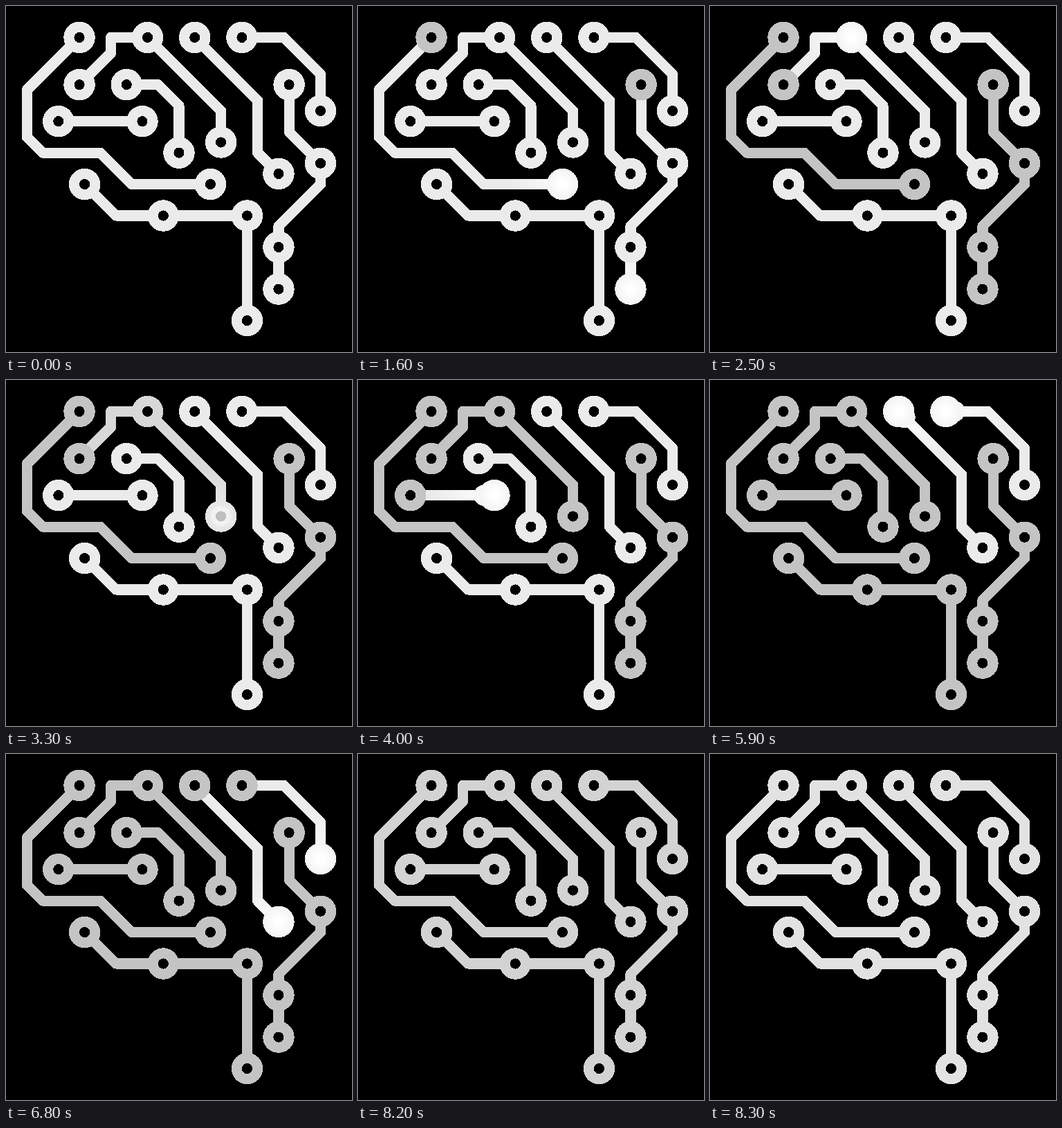
Recreate the animation shown at these times as an HTML page. Size 500 px wide and 500 px high, loop 8400 ms.

```html
<!DOCTYPE html>
<html lang="en">
<head>
<meta charset="utf-8">
<title>Circuit brain</title>
<style>
  html, body { margin: 0; width: 100%; height: 100%; overflow: hidden; background: #000; }
  svg { display: block; width: 500px; height: 500px; }
  path, circle { fill: none; stroke-width: 2; stroke-linejoin: round; shape-rendering: crispEdges; }
  .ring { fill: #000; }
  .glow { fill: url(#glow); }
</style>
</head>
<body>
<svg id="stage" viewBox="0 0 66 66">
  <radialGradient id="glow">
    <stop offset=".2" stop-color="#fff"/>
    <stop offset="1" stop-color="#f3f3f3"/>
  </radialGradient>
</svg>
<script>
const stage = document.getElementById('stage');
const LOOP = 8400, PAUSE = 500, STEP = 200;
const LIGHT = 235, DIM = 196;

// A track is a line with a ring at its start and at each "|" and at its end.
// A group holds its first step for PAUSE; "lead" is the pulse's progress right after it.
const groups = [
  { steps: 6, lead: 0.4, tracks: ['M14 6l-10 10v9l3 3h11l6 6h15', 'M54 15v9l6 6|v4l-8 8v4|v8'] },
  { steps: 6, lead: 0.41, tracks: ['M14 15l6-6v-3h7|l14 14v6'] },
  { steps: 4, lead: 0.88, tracks: ['M10 22h16'] },
  { steps: 5, lead: 0.5, tracks: ['M23 15h6l4 4v9', 'M15 34l6 6h9|h16|v20'] },
  { steps: 5, lead: 0.5, tracks: ['M36 6l12 12v10l4 4', 'M45 6h8l7 7v7'] }
];

function add(tag, attributes, parent = stage) {
  const element = document.createElementNS('http://www.w3.org/2000/svg', tag);
  set(element, attributes);
  return parent.appendChild(element);
}

function set(element, attributes) {
  for (const name in attributes) element.setAttribute(name, attributes[name]);
}

const gray = v => `rgb(${v},${v},${v})`;

function buildTrack(legs, index) {
  const line = add('path', {});
  const lengths = [0];
  let d = '';
  for (const leg of legs.split('|')) {
    d += leg;
    set(line, { d });
    lengths.push(line.getTotalLength());
  }
  const halo = add('radialGradient', { id: 'halo' + index, gradientUnits: 'userSpaceOnUse', r: 10 });
  add('stop', { offset: 0.2, 'stop-color': '#fff', 'stop-opacity': 0.7 }, halo);
  add('stop', { offset: 1, 'stop-color': '#fff', 'stop-opacity': 0 }, halo);
  const shine = add('path', { d, stroke: `url(#halo${index})` });

  const nodes = lengths.map(length => {
    const { x, y } = line.getPointAtLength(length);
    return { x, y, ring: add('circle', { class: 'ring', cx: x, cy: y, r: 2 }) };
  });
  const ball = add('circle', { class: 'glow', r: 2 });
  for (const node of nodes) node.lamp = add('circle', { class: 'glow', cx: node.x, cy: node.y, r: 3 });
  return { line, halo, shine, nodes, ball, length: lengths.at(-1) };
}

let nextStart = PAUSE, trackCount = 0;
for (const group of groups) {
  group.start = nextStart;
  nextStart += PAUSE + STEP * (group.steps - 1);
  group.tracks = group.tracks.map(legs => buildTrack(legs, trackCount++));
}

function drawTrack({ line, halo, shine, nodes, ball, length }, shade, startShade, progress, alpha) {
  const { x, y } = line.getPointAtLength(Math.max(1.65, progress * length));
  set(line, { stroke: gray(shade) });
  set(halo, { cx: x, cy: y });
  set(shine, { opacity: alpha });
  set(ball, { cx: x, cy: y, opacity: alpha });
  nodes.forEach((node, i) => {
    const touched = Math.hypot(node.x - x, node.y - y) < 2.5;
    set(node.ring, { stroke: gray(i ? shade : startShade) });
    set(node.lamp, { opacity: touched ? alpha : 0 });
  });
}

function drawGroup({ start, steps, lead, tracks }, time) {
  const elapsed = time - start;
  const step = elapsed < PAUSE ? 0 : 1 + Math.floor((elapsed - PAUSE) / STEP);
  const waiting = elapsed < 0, done = step >= steps, fading = step === steps - 1;
  const progress = step ? Math.min(1, lead + (1 - lead) * (step - 1) / (steps - 3)) : 0;
  const alpha = waiting || done ? 0 : fading ? 0.5 : 1;
  let shade = done ? DIM : fading ? (LIGHT + DIM) / 2 : LIGHT;
  let startShade = waiting ? LIGHT : DIM;
  if (time >= 8200) shade = startShade = time < 8300 ? 211 : 226;
  tracks.forEach(track => drawTrack(track, shade, startShade, progress, alpha));
}

const began = performance.now();
function tick() {
  const time = (performance.now() - began) % LOOP;
  groups.forEach(group => drawGroup(group, time));
  requestAnimationFrame(tick);
}
tick();
</script>
</body>
</html>
```
